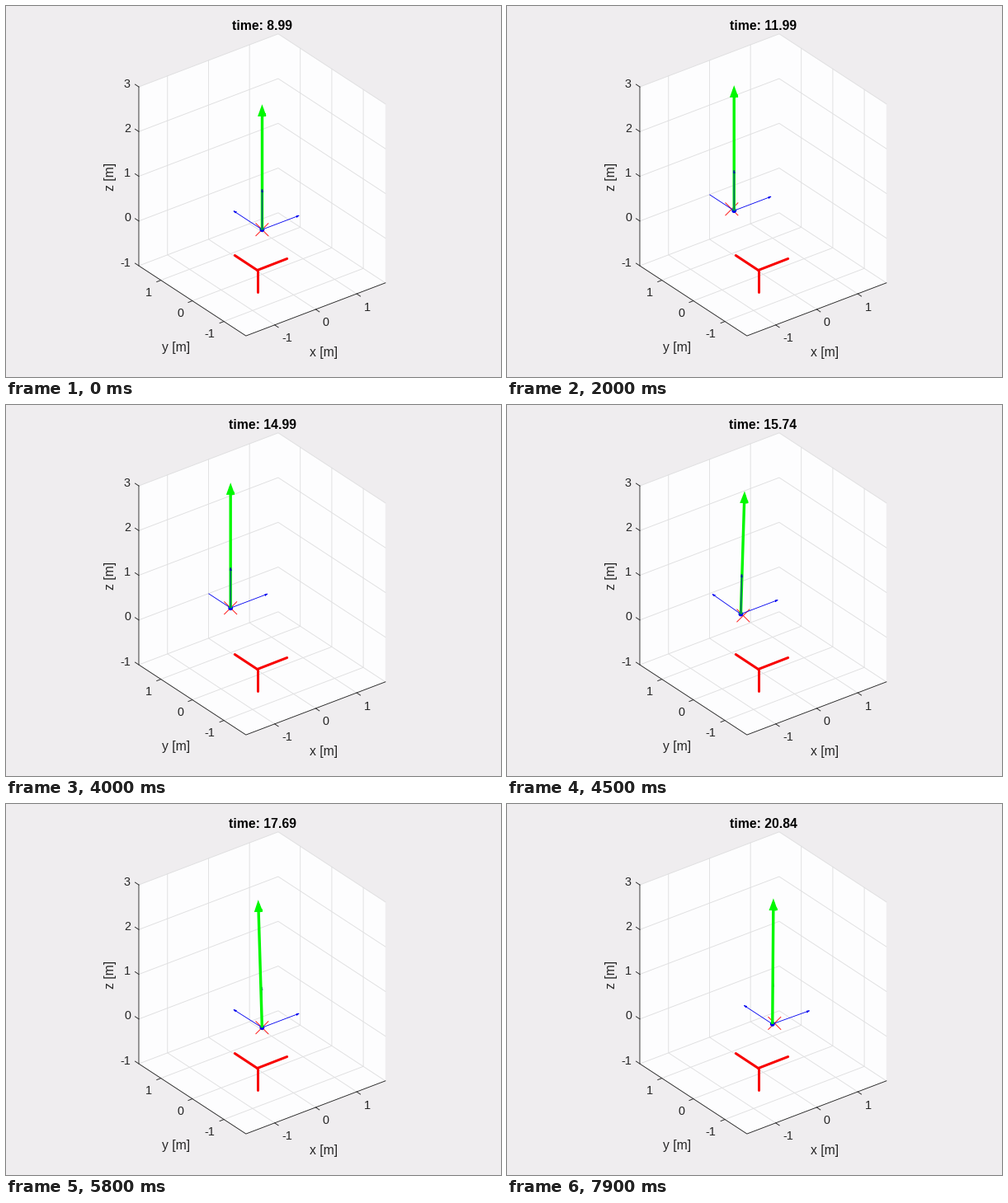
Write a matplotlib script that moves like this. It is 600 px wide and 450 px high and loops after 8 s.

```python
import numpy as np
import matplotlib.pyplot as plt
from matplotlib.animation import FuncAnimation

W, H, DPI = 600, 450, 100
FRAMES, INTERVAL = 80, 100
T0, STEP, SUB = 8.99, 0.15, 30
LIM = 1.7
EX, EY, EZ = np.array([49.7, -18.9]), np.array([-38.2, -25.0]), np.array([0, -54.25])
ORIGIN = np.array([310.4, 271.2])
INK, GREEN, BLUE = "#262626", "#00f800", "#0000f0"

plt.rcParams["font.family"] = "Liberation Sans"
plt.rcParams["axes.unicode_minus"] = False


def px(n):
    return n * 72 / DPI


def project(p):
    return ORIGIN + p[0] * EX + p[1] * EY + p[2] * EZ


def target(t):
    """Piecewise linear set point: out and back along y, then out along x."""
    def ramp(start, length):
        return np.clip((t - start) / length, 0, 1)
    return np.array([ramp(20, 3), ramp(10, 2) - ramp(15, 2)])


def simulate():
    """PD position control with a first order attitude lag."""
    kp, kd, tau, g = 80.0, 12.0, 0.064, 9.81
    dt = STEP / SUB
    pos, vel, acc = np.zeros((3, 2))
    states = []
    for k in range(FRAMES * SUB):
        t = T0 + k * dt
        cmd = kp * (target(t) - pos) - kd * vel
        if k % SUB == 0:
            states.append((pos.copy(), acc / g, cmd / g))
        acc = acc + (cmd - acc) * dt / tau
        vel = vel + acc * dt
        pos = pos + vel * dt
    return states


STATES = simulate()

fig = plt.figure(figsize=(W / DPI, H / DPI), dpi=DPI, facecolor="#efedef")
ax = fig.add_axes([0, 0, 1, 1])
ax.set_xlim(0, W)
ax.set_ylim(H, 0)
ax.axis("off")


def line(points, color, width, z, **kw):
    pts = np.array(points, dtype=float).reshape(-1, 2)
    return ax.plot(pts[:, 0], pts[:, 1], color=color, lw=px(width), zorder=z, **kw)[0]


def line3(points, *args, **kw):
    return line([project(p) for p in points], *args, **kw)


def label(x, y, s, size, **kw):
    opts = dict(color=INK, ha="center", va="center_baseline")
    opts.update(kw)
    return ax.text(x, y, s, fontsize=px(size), **opts)


def draw_box():
    a, lo, hi = LIM, -1, 3
    outline = [(-a, a, hi), (a, a, hi), (a, -a, hi), (a, -a, lo), (-a, -a, lo), (-a, a, lo)]
    ax.add_patch(plt.Polygon([project(p) for p in outline], fc="#fdfdfe", ec="none", zorder=0))
    grid = ("#dfdfe0", 0.9, 1)
    for z in range(lo, hi + 1):
        line3([(-a, a, z), (a, a, z), (a, -a, z)], *grid)
    for v in (-1, 0, 1):
        line3([(v, a, hi), (v, a, lo), (v, -a, lo)], *grid)
        line3([(a, v, hi), (a, v, lo), (-a, v, lo)], *grid)
    line3([(-a, a, hi), (-a, a, lo), (-a, -a, lo), (a, -a, lo)], INK, 0.9, 2)

    def tick(p, d, shift, s, ha):
        q = project(p)
        line([q, q + d], INK, 0.9, 2)
        label(*(q + shift), s, 14.4, ha=ha)

    for z in range(lo, hi + 1):
        tick((-a, a, z), (-4.5, -3), (-10, -5), str(z), "right")
    for v in (-1, 0, 1):
        tick((-a, v, lo), (-5, 2), (-11, 14), str(v), "right")
        tick((v, -a, lo), (4.5, 3), (8.5, 15), str(v), "left")
    label(206, 413, "y [m]", 15.8)
    label(385.5, 418.5, "x [m]", 15.8)
    label(126, 206.5, "z [m]", 15.8, rotation=90, va="center")


draw_box()
for end in ((277.3, 302.5), (340.7, 306.5), (304.6, 346.5)):
    line([(304.6, 320.5), end], "#f80000", 3, 3, solid_capstyle="round")

title = label(310.5, 29, "", 15.8, color="black", weight="bold", va="baseline")
cross = [line([], "#ff2020", 1, 4) for _ in range(2)]
dot = ax.add_patch(plt.Circle((0, 0), 2.9, color=BLUE, lw=0, zorder=5))


class Arrow:
    def __init__(self, color, width, z, length, half):
        self.shaft = line([], color, width, z, solid_capstyle="butt")
        self.tip = line([], color, width, z, solid_joinstyle="miter")
        self.length, self.half = length, half

    def set(self, base, vec):
        end = base + vec
        cut = end[1] > LIM
        if cut:
            end = base + vec * (LIM - base[1]) / vec[1]
        a, b = project(base), project(end)
        self.shaft.set_data(*zip(a, b))
        self.tip.set_visible(not cut)
        u = (b - a) / np.hypot(*(b - a))
        n = np.array([-u[1], u[0]]) * self.half
        back = b - u * self.length
        self.tip.set_data(*zip(back + n, b, back - n, back + n))

    def set_zorder(self, z):
        self.shaft.set_zorder(z)
        self.tip.set_zorder(z)


force = Arrow(GREEN, 3.4, 6, 8, 2.9)
body = [Arrow(BLUE, 0.85, 4.5, 3, 0.8) for _ in range(2)]
up = Arrow((0, 0, 0.75, 0.7), 1.3, 7, 3, 0.7)


def update(i):
    t = T0 + STEP * i
    pos, tilt, cmd = STATES[i]
    title.set_text(f"time: {t:.2f}")

    cx, cy = project((*target(t), 0))
    r = 7.5
    cross[0].set_data([cx - r, cx + r], [cy - r, cy + r])
    cross[1].set_data([cx - r, cx + r], [cy + r, cy - r])

    base = np.array([*pos, 0])
    dot.center = project(base)
    force.set(base, 2.71 * np.array([*cmd, 1]))

    zb = np.array([*tilt, 1])
    zb /= np.linalg.norm(zb)
    xb = np.array([zb[2], 0, -zb[0]])
    xb /= np.linalg.norm(xb)
    yb = np.cross(zb, xb)
    body[0].set(base, 0.9 * xb)
    body[1].set(base, 0.9 * yb)
    up.set(base, 0.9 * zb)
    up.set_zorder(5.5 if t > 17.5 else 7)
    return []


anim = FuncAnimation(fig, update, frames=FRAMES, interval=INTERVAL,
                     init_func=lambda: update(0), repeat=True, repeat_delay=0, blit=False)
plt.show()
```
